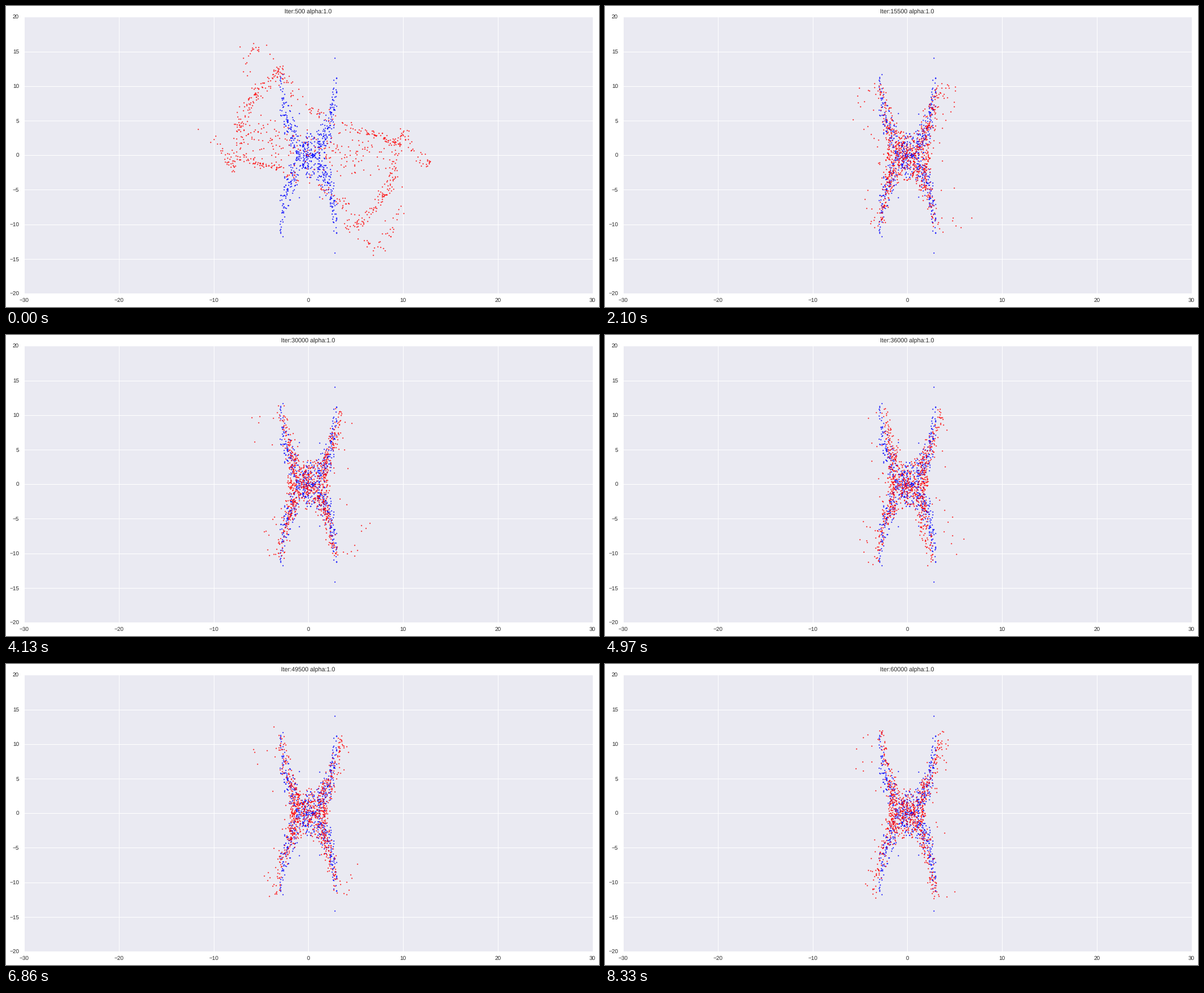
These frames come from a looping animation (1050x533 px, 8400 ms). A matplotlib script:

```python
import numpy as np
import matplotlib.pyplot as plt
from matplotlib.animation import FuncAnimation

W, H, DPI = 1050, 533, 100
FRAMES, STEP = 120, 70
PAIRS, PER_ARM = 310, 200
SETTLE = 17          # frames until the cloud has collapsed onto the cross
WALL_SHARE = .2
PX = 72 / DPI
INK = "#262626"
LEFT, RIGHT, TOP, BOTTOM = 32, 1038.5, 19.3, 509.2

plt.rcParams["font.family"] = "Liberation Sans"
plt.rcParams["text.hinting"] = "none"

# Left half of the opening sheet: (weight, spread, points along the stroke).
# The right half is its reflection through PIVOT.
PIVOT = np.array([.9, .9])
UPPER = [
    (.3, .45, (4.6, 4.1), (.5, 6.3), (-2, 9), (-2.8, 12.7)),
    (.55, .4, (-2.7, 12.7), (-5.2, 9.5), (-6.8, 6.5), (-7.4, .5)),
    (.15, .5, (-3.5, 13.8), (-6, 15.8), (-7.4, 10)),
]
LOWER = [
    (.5, 1.7, (.5, .5), (-6, 3)),
    (.28, .25, (-2.8, -1.9), (-5.5, -1.2), (-7.8, .3)),
    (.22, .35, (-8, -2), (-8.6, .2), (-11, 3.6)),
]


def make_data():
    rng = np.random.default_rng(12)
    x = rng.uniform(-3, 3, PAIRS)
    y = x**2 + np.clip(rng.normal(0, 1.6, PAIRS), -3.2, 2.7)
    extra = [(2.8, 14.1), (2.95, 11.15), (-2.7, 11.7), (2.65, 10.9),
             (-.95, 6.1), (1.15, 6)]
    half = np.vstack([np.column_stack([x, y]), extra])
    return np.vstack([half, half * (1, -1)])


def along(strokes, u, noise):
    """Place u in 0..1 on a chain of strokes, each with its own spread."""
    edges = np.cumsum([0] + [s[0] for s in strokes])
    out = np.empty((len(u), 2))
    for lo, hi, (_, spread, *pts) in zip(edges, edges[1:], strokes):
        m = (u >= lo) & (u < hi + 1e-9)
        t = (u[m] - lo) / (hi - lo)
        knots = np.linspace(0, 1, len(pts))
        for axis, values in enumerate(np.transpose(pts)):
            out[m, axis] = np.interp(t, knots, values) + spread * noise[m, axis]
    return out


def opening_arm(sx, sy, u, noise):
    pts = along(UPPER if sx != sy else LOWER, u, noise)
    if (sx, sy) == (-1, -1) or (sx, sy) == (-1, 1):
        return pts
    return 2 * PIVOT - pts


def settled_arm(i, sx, sy, u, noise, rng):
    """Wall beside the centre, curved limb, then a loose arc of strays."""
    late = max(0, i - SETTLE)
    early = np.exp(-late / 18)
    grow = np.sqrt(late / (FRAMES - SETTLE))
    dip = max(0, np.cos(2 * np.pi * (i - SETTLE) / 54)) * np.exp(-(i / 90)**3)
    slant = sx != sy     # the top-left and bottom-right arms lean inwards

    wall = 1.5 + .5 * np.exp(-(late / 45)**2)
    stray = .05 + .07 * early
    if slant:
        reach = 2.9 - .9 * dip
    else:
        reach = 2.3 + 1.3 * grow + (.6 * (1 - grow) if sx > 0 else 0)
    tip = np.array([sx * reach, sy * (8.5 + 3 * grow)])
    bulge = np.array([sx * (6 + 3 * slant + 3 * early), tip[1] + sy * 2.5 * early])

    out = np.empty((len(u), 2))
    side, far = u < WALL_SHARE, u > 1 - stray
    limb = ~(side | far)

    depth = rng.uniform(-.5, 5, side.sum())
    out[side, 0] = sx * (wall + .03 * (depth - 2)**2) + .22 * noise[side, 0]
    out[side, 1] = sy * depth

    a = (u[limb] - WALL_SHARE) / (1 - stray - WALL_SHARE)
    out[limb, 0] = tip[0] * a + (.2 + .4 * (1 - a)) * noise[limb, 0]
    out[limb, 1] = tip[1] * a**2.1 + (.6 + 1.2 * (1 - a)) * noise[limb, 1]

    v = rng.uniform(0, 1, (far.sum(), 1))**1.4
    foot = np.array([sx * (wall + .9), sy * .5])
    arc = (1 - v)**2 * tip + 2 * v * (1 - v) * bulge + v**2 * foot
    inner = np.column_stack([tip[0] * (1 - .25 * v[:, 0]), arc[:, 1]])
    out[far] = inner + (arc - inner) * rng.uniform(.2, 1.1, v.shape)
    out[far] += noise[far] * (.25, .7)
    return out


def cloud(i):
    rng = np.random.default_rng(700 + i)
    ease = 1 - max(0, 1 - i / SETTLE)**2
    parts = []
    for sy in (1, -1):
        for sx in (-1, 1):
            u = rng.uniform(0, 1, PER_ARM)
            noise = np.clip(rng.normal(0, 1, (PER_ARM, 2)), -2, 2)
            start = opening_arm(sx, sy, u, noise)
            end = settled_arm(i, sx, sy, u, noise, rng)
            parts.append(start + (end - start) * ease)
    return np.vstack(parts)


fig = plt.figure(figsize=(W / DPI, H / DPI), dpi=DPI, facecolor="white")
ax = fig.add_axes([LEFT / W, 1 - BOTTOM / H, (RIGHT - LEFT) / W, (BOTTOM - TOP) / H],
                  facecolor="#EAEAF2")
ax.set(xlim=(-30, 30), ylim=(-20, 20),
       xticks=range(-30, 31, 10), yticks=range(-20, 21, 5))
ax.tick_params(length=0, labelleft=False, labelbottom=False)
ax.grid(color="white", lw=PX)
ax.set_axisbelow(True)
for spine in ax.spines.values():
    spine.set_visible(False)


def label(x, base, text, size, ha):
    return fig.text(x / W, 1 - base / H, text, fontsize=size * PX, color=INK,
                    ha=ha, va="baseline")


def signed(v):
    return str(v).replace("-", "\u2212")


for v in range(-30, 31, 10):
    label(LEFT + (v + 30) / 60 * (RIGHT - LEFT), 525, signed(v), 10, "center")
for v in range(-20, 21, 5):
    label(23, TOP + (20 - v) / 40 * (BOTTOM - TOP) + 3.7, signed(v), 10, "right")
title = label((LEFT + RIGHT) / 2, 13.6, "", 10.8, "center")

data = make_data()
dot = dict(s=(2 * PX)**2, linewidths=0)
ax.scatter(data[:, 0], data[:, 1], color="blue", zorder=3, **dot)
red = ax.scatter([], [], color="red", zorder=4, **dot)


def draw(i):
    red.set_offsets(cloud(i))
    title.set_text(f"Iter:{500 * (i + 1)} alpha:1.0")
    return red, title


anim = FuncAnimation(fig, draw, frames=FRAMES, interval=STEP, repeat=True,
                     repeat_delay=0, blit=False)
plt.show()
```
